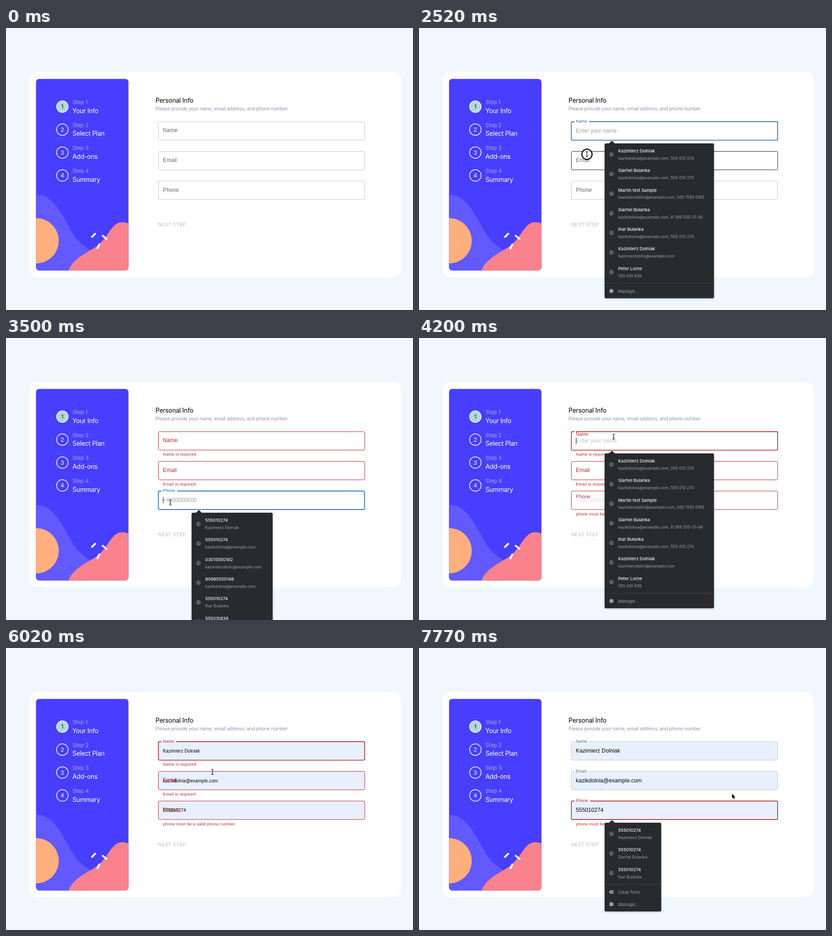
Recreate the animation shown at these times as an HTML page with a canvas. Size 899 px wide and 623 px high, loop 8000 ms.

```html
<!DOCTYPE html>
<html lang="en">
<head>
<meta charset="utf-8">
<title>Multi-step form</title>
<style>
html, body { margin: 0; width: 100%; height: 100%; overflow: hidden; background: #f0f7ff; }
canvas { display: block; }
</style>
</head>
<body>
<canvas id="stage" width="899" height="623"></canvas>
<script>
const ctx = document.getElementById('stage').getContext('2d');
const LOOP = 8000, STEP = 70;
const UI = 'Inter, sans-serif', FORM = '"Liberation Sans", Arial, sans-serif';
const BLUE = [27, 101, 181], RED = [181, 38, 42], GRAY = [102, 102, 102];

const person = 'Kazimierz Dolniak', second = 'Siarhei Bulanka', third = 'Ihar Bulanka', fourth = 'Peter Lorne';
const mail = 'kazikdolnia@example.com', longMail = 'kazimierzdolni@example.com';
const phones = ['555 010 274', '030 1555 0182', '8 099 555-01-46', '555 010 839'];
const digits = phones.map(p => p.replace(/\D/g, ''));

const nameList = [
  [person, `${mail}, ${phones[0]}`], [second, `${mail}, ${phones[0]}`],
  ['Martin test Sample', `${longMail}, ${phones[1]}`], [second, `${mail}, ${phones[2]}`],
  [third, `${mail}, ${phones[0]}`], [person, longMail], [fourth, phones[3]]];
const mailList = [[mail, person], [mail, second], [longMail, 'Martin test Sample'], [mail, third],
  [longMail, person], [mail, second], [longMail, person]];
const phoneList = [[digits[0], person], [digits[0], mail], [digits[1], longMail], [digits[2], mail],
  [digits[0], third], [digits[3], fourth], [digits[0], second]];
const matchList = [person, second, third].map(n => [digits[0], n]);

// toggles: [time, label raised]; error: [from, to]
const FILL = 6060, PREVIEW = 5530;
const fields = [
  { label: 'Name', hint: 'Enter your name', value: person, help: 'Name is required',
    error: [2530, FILL], toggles: [[1590, 1], [2530, 0], [4140, 1]] },
  { label: 'Email', hint: 'Enter your email', value: mail, help: 'Email is required',
    error: [3080, FILL], toggles: [[2530, 1], [3080, 0], [FILL, 1]] },
  { label: 'Phone', hint: '+4800000000', value: digits[0], help: 'phone must be a valid phone number.',
    error: [4140, LOOP], toggles: [[3080, 1], [4140, 0], [FILL, 1]] }];
const focusLog = [[1590, 0], [2530, 1], [3080, 2], [4140, 0], [7240, 2]];
const popups = [
  [1680, 2530, 0, 241.5, nameList], [2660, 3080, 1, 179, mailList], [3150, 4140, 2, 179, phoneList],
  [4200, 6020, 0, 241.5, nameList], [7310, LOOP, 2, 125, matchList]];
const presses = [[1540, 1680], [2520, 2660], [3010, 3150], [4130, 4200], [5880, 6020], [7210, 7350]];
const moves = [
  [350, 452, 606], [490, 441, 263], [700, 441, 263], [1120, 440, 217], [1960, 440, 217], [2380, 371, 279],
  [2800, 371, 279], [3000, 364, 355], [3340, 364, 355], [3500, 363, 363], [3740, 363, 363], [3990, 430, 218],
  [4940, 430, 218], [4970, 430, 218.5], [5200, 430, 218.5], [5600, 456, 274], [6300, 456, 274],
  [7180, 690, 352], [7320, 690, 352], [7560, 691, 322]];

const clamp = x => Math.max(0, Math.min(1, x));
const rgb = c => `rgb(${c})`;
const mix = (a, b, p) => a.map((v, i) => Math.round(v + (b[i] - v) * p));
const during = (t, [from, to]) => t >= from && t < to;
const last = (log, t) => log.filter(e => e[0] <= t).pop();
const fieldTop = i => 206.5 + 65.6 * i;

function text(str, x, y, size, color, font = FORM, spacing = 0.1, weight = 400) {
  ctx.font = `${weight} ${size}px ${font}`;
  ctx.letterSpacing = spacing + 'px';
  ctx.fillStyle = color;
  ctx.fillText(str, x, y);
}
function box(x, y, w, h, r, color) {
  ctx.fillStyle = color;
  ctx.beginPath();
  ctx.roundRect(x, y, w, h, r);
  ctx.fill();
}
function shape(d, fill, stroke, width = 1) {
  const path = new Path2D(d);
  if (stroke) { ctx.strokeStyle = stroke; ctx.lineWidth = width; ctx.stroke(path); }
  if (fill) { ctx.fillStyle = fill; ctx.fill(path); }
}
function circle(x, y, r, fill, stroke, width = 1) {
  ctx.beginPath();
  ctx.arc(x, y, r, 0, 7);
  if (fill) { ctx.fillStyle = fill; ctx.fill(); }
  if (stroke) { ctx.strokeStyle = stroke; ctx.lineWidth = width; ctx.stroke(); }
}

function drawSidebar() {
  ctx.save();
  ctx.beginPath();
  ctx.roundRect(66.3, 112.5, 204.2, 423.2, 7);
  ctx.clip();
  box(66, 112, 205, 424, 0, '#483eff');
  shape('M66 369C98 366 118 400 142 444C154 468 168 479 188 492V536H66Z', '#6259ff');
  shape('M138 536C146 514 168 502 188 490C206 480 214 470 222 459C234 442 244 421 271 432V536Z', '#f9828d');
  circle(66.5, 470, 50, '#ffaf7e');
  ctx.lineCap = 'round';
  shape('M190 461.5L197 454.5M213.5 459L222 466M202 487L206 478', null, '#fff', 4);
  ctx.lineCap = 'butt';
  ctx.restore();
  ['Your Info', 'Select Plan', 'Add-ons', 'Summary'].forEach((title, i) => {
    const y = 173.7 + 50.7 * i;
    circle(124.5, y, 12.7, i ? null : '#add8e6', '#fff', 1.5);
    ctx.textAlign = 'center';
    text(i + 1, 124.5, y + 4.4, 12, i ? '#fff' : '#111', UI, 0);
    ctx.textAlign = 'left';
    text('Step ' + (i + 1), 146.7, y - 5.8, 12, '#a7a5d8', UI, -0.15);
    text(title, 146.7, y + 14, 14, '#fff', UI, -0.25);
  });
}

function drawField(f, i, t, mouse) {
  const top = fieldTop(i), focused = at => (last(focusLog, at) || [])[1] === i;
  const tint = at => during(at, f.error) ? RED : focused(at) ? BLUE : GRAY;
  const [since, raised] = last(f.toggles, t) || [-LOOP, 0];
  const ease = 1 - (1 - clamp((t - since) / 200)) ** 3;
  const up = raised ? ease : 1 - ease;
  const active = focused(t), error = during(t, f.error), filled = t >= PREVIEW;
  const hover = mouse && !mouse.overPopup && mouse.field === i;

  const l = 336.5, r = 792.2, y0 = top + 0.4, y1 = top + 41.2, w = active ? 1.6 : 1;
  if (filled) box(l, y0, r - l, y1 - y0, 3, '#e8f0fe');

  // the outline leaves a gap for the raised label
  ctx.font = `9px ${FORM}`;
  ctx.letterSpacing = '0.1px';
  const open = raised ? clamp((t - since - 50) / 100) : 1 - clamp((t - since) / 50);
  const gap = (ctx.measureText(f.label).width + 8) * open;
  ctx.beginPath();
  ctx.moveTo(l + 7 + gap, y0);
  ctx.arcTo(r, y0, r, y1, 3);
  ctx.arcTo(r, y1, l, y1, 3);
  ctx.arcTo(l, y1, l, y0, 3);
  ctx.arcTo(l, y0, r, y0, 3);
  ctx.lineTo(l + 7, y0);
  ctx.lineWidth = w;
  ctx.strokeStyle = error || active ? rgb(tint(t)) : hover ? '#212121' : '#c4c4c4';
  ctx.stroke();

  const base = top + 24.6;
  if (filled) text(f.value, 346.6, base, t < FILL ? 10 : 12, '#000');
  else if (up > 0) text(f.hint, 346.6, base, 12, `rgba(0,0,0,${0.38 * up})`);
  text(f.label, 346.6, top + 23.8 - 21.3 * up, 12 - 3 * up, rgb(mix(tint(since - 1), tint(t), ease)));
  if (error) text(f.help, 346.6, top + 53.8, 9, rgb(RED), FORM, 0.3);

  const blink = active && Math.floor((t - last(focusLog, t)[0]) / 500) % 2 === 0;
  if (blink && !during(t, [PREVIEW, FILL])) box(346.6, top + 14, 1, 13.5, 0, '#000');
}

function drawPopup([, , field, width, items], mouse) {
  const x = 410, top = fieldTop(field) + 48.4, rows = items === matchList ? ['Clear form', 'Manage...'] : ['Manage...'];
  const line = top + items.length * 43.3 + 6;
  const muted = '#9ba0a4', dark = '#272b2e';
  ctx.save();
  ctx.shadowColor = 'rgba(0,0,0,.3)';
  ctx.shadowBlur = 4;
  ctx.shadowOffsetY = 1;
  box(x, top, width, line + 6 + 27 * rows.length - top, 3, dark);
  ctx.restore();
  shape(`M419 ${top + 0.5}L426 ${top - 6}L433 ${top + 0.5}Z`, dark);
  if (mouse && mouse.overPopup) box(x, top + 4, width, 43, 0, '#3c4043');
  items.forEach(([title, detail], i) => {
    const y = top + 24.5 + i * 43.3;
    text(title, 440, y - 4.5, 9.5, '#f1f3f4', UI, 0, 500);
    text(detail, 440, y + 11.3, 8.9, muted, UI, -0.02);
    circle(425, y, 4.3, null, muted);
    circle(425, y - 1.2, 1.5, muted);
    shape(`M422 ${y + 3}Q425 ${y - 0.3} 428 ${y + 3}`, null, muted, 1.1);
  });
  box(x, line - 0.5, width, 1, 0, '#42464a');
  rows.forEach((label, i) => {
    const y = line + 17 + 27 * i;
    text(label, 440, y + 3.5, 9.5, muted, UI, 0.1);
    if (label === 'Clear form') {
      shape(`M419.5 ${y}l3 -3.7h7v7.4h-7Z`, muted);
      shape(`M424 ${y - 1.7}l3.4 3.4m0 -3.4l-3.4 3.4`, null, dark);
    } else circle(425, y, 4.6, muted);
  });
}

function mouseAt(t, popup) {
  const from = last(moves, t);
  if (!from) return null;
  const to = moves[moves.indexOf(from) + 1] || from;
  let p = to === from ? 0 : (t - from[0]) / (to[0] - from[0]);
  p = p * p * (3 - 2 * p);
  const x = from[1] + (to[1] - from[1]) * p, y = from[2] + (to[2] - from[2]) * p;
  const field = x > 336 && x < 793 ? fields.findIndex((f, i) => y >= fieldTop(i) && y <= fieldTop(i) + 41.5) : -1;
  const overPopup = !!popup && x > 410 && x < 410 + popup[3] && y > fieldTop(popup[2]) + 48;
  return { x, y, field, overPopup };
}

function drawMouse({ x, y, field, overPopup }, pressed) {
  ctx.save();
  ctx.translate(x, y);
  if (pressed) circle(0, 0, 11.3, 'rgba(255,255,255,.6)', '#000', 2.3);
  if (field >= 0 && !overPopup) {
    const beam = 'M-2.6 -5.8Q0 -5.8 0 -4.3Q0 -5.8 2.6 -5.8M0 -4.5V4.5M-2.6 5.8Q0 5.8 0 4.3Q0 5.8 2.6 5.8M-1.5 1.8H1.5';
    shape(beam, null, 'rgba(255,255,255,.8)', 2.4);
    shape(beam, null, '#000', 1.1);
  } else {
    shape('M0.5 0V10.2L2.8 8L4.5 11.8L6.2 11L4.6 7.4H7.8Z', '#000', '#fff', 1.6);
  }
  ctx.restore();
}

function draw(t) {
  box(0, 0, 899, 623, 0, '#f0f7ff');
  box(51.3, 97.5, 821.7, 453.2, 18, '#fff');
  drawSidebar();
  text('Personal Info', 330.3, 165.2, 14, '#000', UI, -0.25);
  text('Please provide your name, email address, and phone number', 330.3, 181.7, 10.5, '#8f96b0', UI, -0.2);
  text('NEXT STEP', 336.2, 438.2, 10.5, '#bdbdbd', FORM, 0.3);

  const popup = popups.find(p => during(t, p));
  const mouse = mouseAt(t, popup);
  fields.forEach((f, i) => drawField(f, i, t, mouse));
  if (popup) drawPopup(popup, mouse);
  if (mouse) drawMouse(mouse, presses.some(p => during(t, p)));
}

function tick() {
  const t = performance.now() % LOOP;
  draw(Math.min(7770, Math.floor(t / STEP) * STEP));
  requestAnimationFrame(tick);
}
tick();
</script>
</body>
</html>
```
